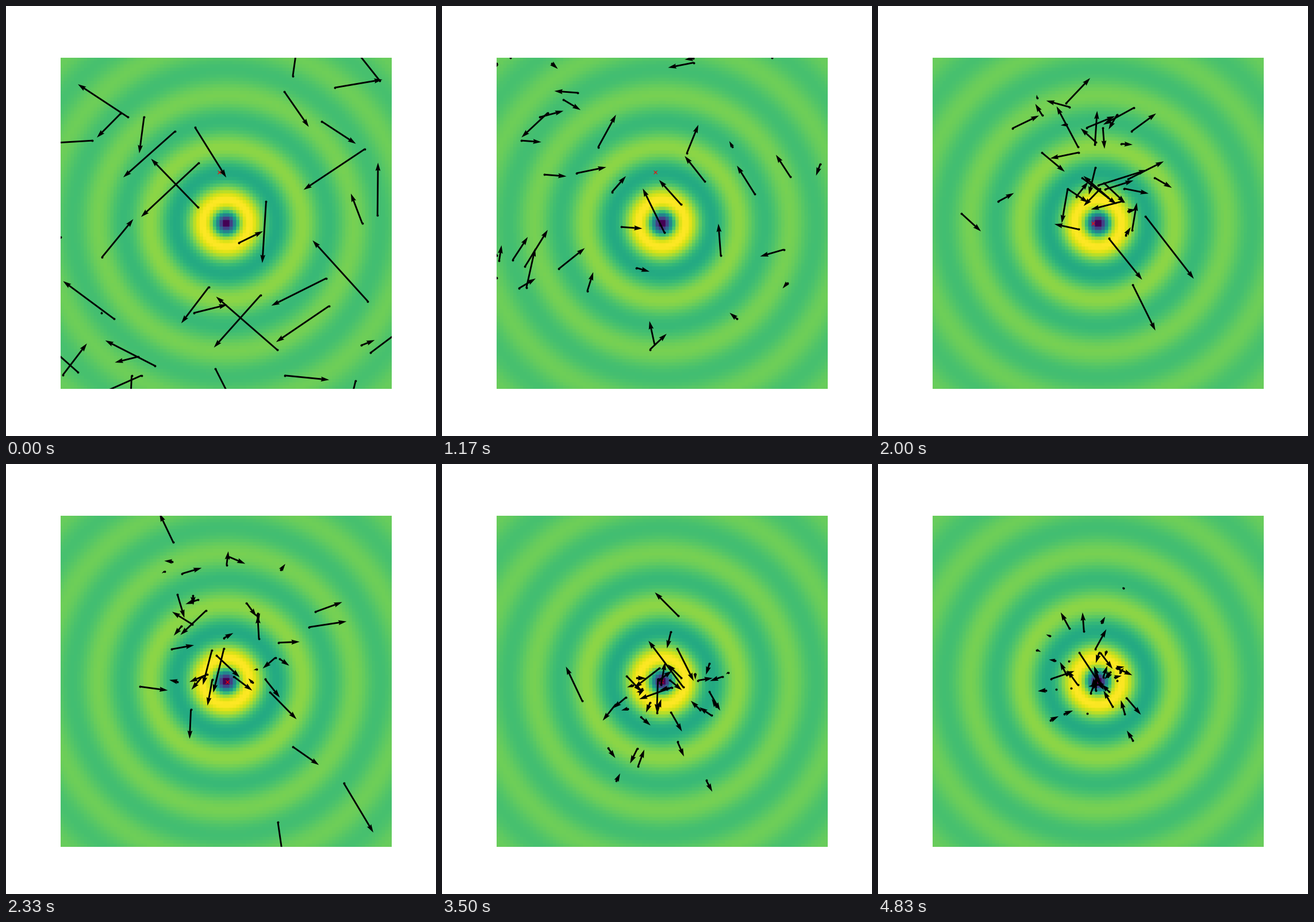
Recreate the animation shown at these times as a matplotlib script. Size 748 by 748 pixels, loop 4990 ms.

```python
import numpy as np
import matplotlib.pyplot as plt
from matplotlib.animation import FuncAnimation

SIZE, DPI = 748, 100
STEPS, LOOP_MS = 30, 4990
COUNT, SEED = 40, 12
CENTRE = np.array([383.35, 377.74])      # plot centre, px
HALF = 288.0                             # plot half width, px
UNIT = HALF / 10                         # px per unit of the search space
SPEED = 108                              # largest starting speed per axis, px
INERTIA, PULL = 0.94, 0.105

# Best point found so far: first step, x, y
BEST = [(0, 371, 289), (9, 374, 378), (13, 385, 379), (21, 382, 378.5)]


def landscape(r):
    """Damped ripple with its minimum at the centre."""
    return -np.cos(2 * r) / np.sqrt(0.26 + r ** 2)


def cost(pos):
    return landscape(np.hypot(*(pos - CENTRE).T) / UNIT)


def best_at(step):
    return np.array([b[1:] for b in BEST if b[0] <= step][-1], float)


def clamp(pos):
    return np.clip(pos, CENTRE - HALF, CENTRE + HALF)


def simulate():
    """Particle swarm: positions and velocities for every step."""
    rng = np.random.default_rng(SEED)
    shape = (COUNT, 2)
    # Slightly oversized start area, so a few particles sit on the border
    pos = clamp(CENTRE + 1.03 * HALF * rng.uniform(-1, 1, shape))
    vel = SPEED * rng.uniform(-1, 1, shape)
    own, own_cost = pos.copy(), cost(pos)
    states = [(pos, vel)]
    for step in range(1, STEPS):
        r1, r2 = rng.random((2, *shape))
        vel = (INERTIA * vel + PULL * r1 * (own - pos)
               + PULL * r2 * (best_at(step - 1) - pos))
        pos = clamp(pos + vel)
        now = cost(pos)
        better = now < own_cost
        own[better], own_cost[better] = pos[better], now[better]
        states.append((pos, vel))
    return states


states = simulate()

fig = plt.figure(figsize=(SIZE / DPI, SIZE / DPI), dpi=DPI, facecolor="white")
ax = fig.add_subplot()
ax.axis("off")

# Each cell is repeated so that bilinear sampling only softens its edges
axis = np.linspace(-10, 10, 100).repeat(6)
gx, gy = np.meshgrid(axis, axis)
(left, top), (right, bottom) = CENTRE - HALF, CENTRE + HALF
ax.imshow(landscape(np.hypot(gx, gy)), cmap="viridis",
          interpolation="bilinear", extent=(left, right, bottom, top))

pos, vel = states[0]
mark, = ax.plot(*best_at(0), "x", color="red", ms=4.5, mew=0.75, zorder=2)
dots, = ax.plot(*pos.T, "o", color="black", ms=2.8, mew=0, zorder=3)
arrows = ax.quiver(*pos.T, *vel.T, color="black", width=0.005, angles="xy",
                   scale_units="xy", scale=1, zorder=3)
ax.set(xlim=(left, right), ylim=(bottom, top))


def draw(step):
    pos, vel = states[step]
    arrows.set_offsets(pos)
    arrows.set_UVC(*vel.T)
    dots.set_data(*pos.T)
    bx, by = best_at(step)
    mark.set_data([bx], [by])
    return arrows, dots, mark


anim = FuncAnimation(fig, draw, frames=STEPS, interval=LOOP_MS / STEPS,
                     repeat=True, repeat_delay=0, blit=False)
plt.show()
```
